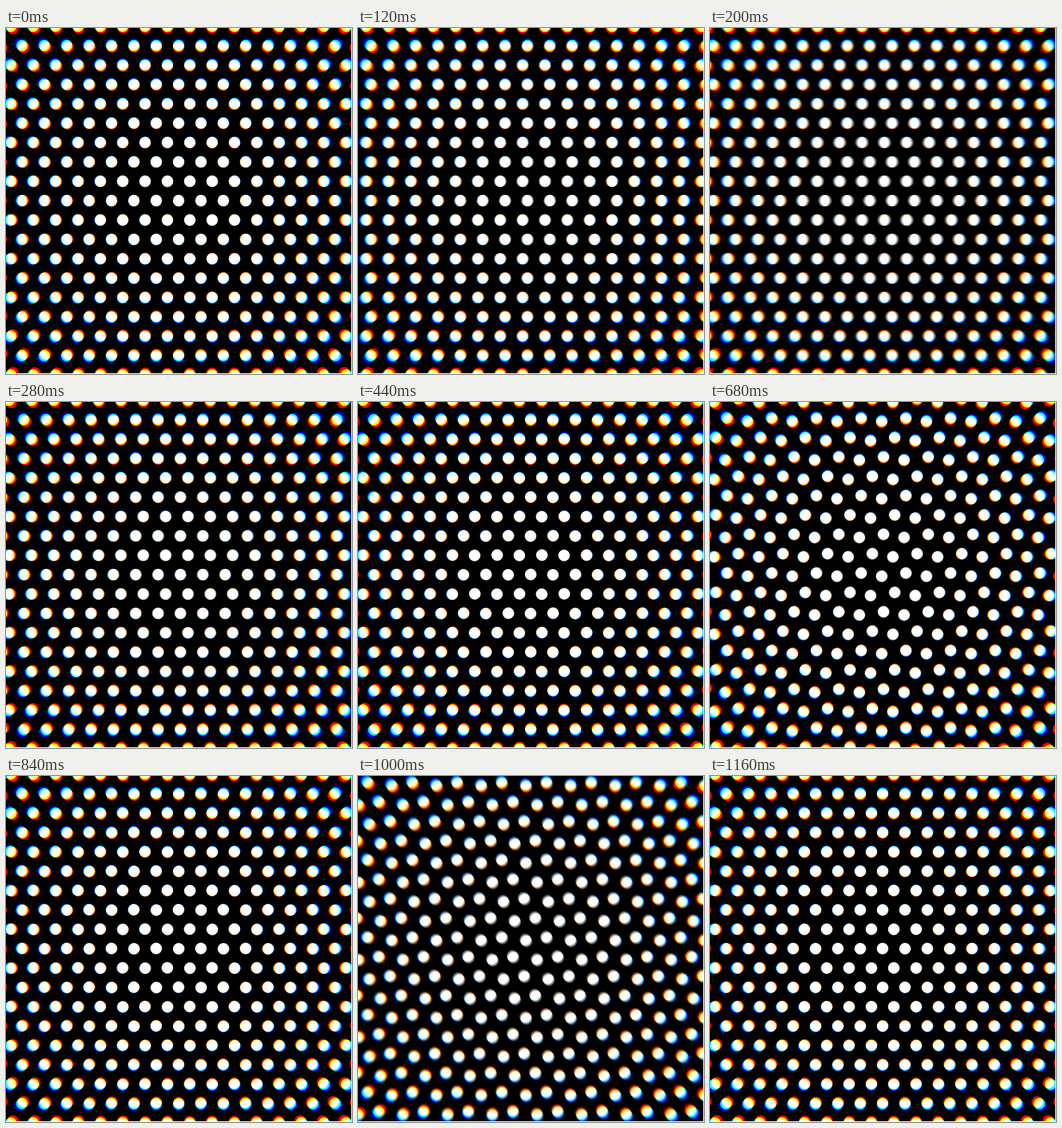
An HTML page with a canvas that plays this animation: 460 by 460 pixels, repeating every 1.2 s.

```html
<!DOCTYPE html>
<html lang="en">
<head>
<meta charset="utf-8">
<title>Sliding dots</title>
<style>
html, body { margin: 0; width: 100%; height: 100%; overflow: hidden; background: #fff; }
canvas { display: block; }
</style>
</head>
<body>
<canvas id="stage" width="459" height="459"></canvas>
<script>
const ctx = document.getElementById('stage').getContext('2d');
const SIZE = 459, GAP = 29.75, ROW = GAP * Math.sqrt(3) / 2, RADIUS = 7.65;
const STEP = 40, FRAMES = 30, PHASES = 3;
const SAMPLES = 15, SHUTTER = 0.6;
const LEVEL = 255 / SAMPLES;
// Colour fringes: red is pulled inwards and blue pushed outwards, growing with distance squared.
const FRINGE = 3.9e-5;
const CHANNELS = [
  { color: `rgb(${LEVEL},0,0)`, spread: -FRINGE },
  { color: `rgb(0,${LEVEL},0)`, spread: 0 },
  { color: `rgb(0,0,${LEVEL})`, spread: FRINGE }
];

const ease = p => p < 0.5 ? 4 * p ** 3 : 1 - 4 * (1 - p) ** 3;

// Hexagonal lattice whose alternate rows slide in opposite directions.
function lattice(shift, spread) {
  const path = new Path2D();
  for (let j = -13; j <= 13; j++) {
    const offset = j & 1 ? GAP / 2 + shift : -shift;
    for (let i = -13; i <= 13; i++) {
      const x0 = i * GAP + offset, y0 = j * ROW;
      const dist = Math.hypot(x0, y0);
      if (dist > 345) continue;
      const scale = 1 + spread * dist;
      const x = x0 * scale, y = y0 * scale;
      path.moveTo(x + RADIUS, y);
      path.arc(x, y, RADIUS, 0, Math.PI * 2);
    }
  }
  return path;
}

function draw(frame) {
  ctx.setTransform(1, 0, 0, 1, 0, 0);
  ctx.globalCompositeOperation = 'source-over';
  ctx.fillStyle = '#000';
  ctx.fillRect(0, 0, SIZE, SIZE);
  ctx.globalCompositeOperation = 'lighter';
  // Motion blur: add up several moments while the shutter is open.
  for (let s = 0; s < SAMPLES; s++) {
    const t = (frame + SHUTTER * s / SAMPLES) / FRAMES * PHASES;
    const phase = Math.floor(t);
    const shift = GAP * ease(t - phase);
    ctx.setTransform(1, 0, 0, 1, SIZE / 2, SIZE / 2);
    ctx.rotate(phase * Math.PI * 2 / PHASES);
    for (const { color, spread } of CHANNELS) {
      ctx.fillStyle = color;
      ctx.fill(lattice(shift, spread));
    }
  }
}

let shown = -1;
function tick() {
  const frame = Math.floor(performance.now() / STEP) % FRAMES;
  if (frame !== shown) draw(shown = frame);
  requestAnimationFrame(tick);
}
tick();
</script>
</body>
</html>
```
